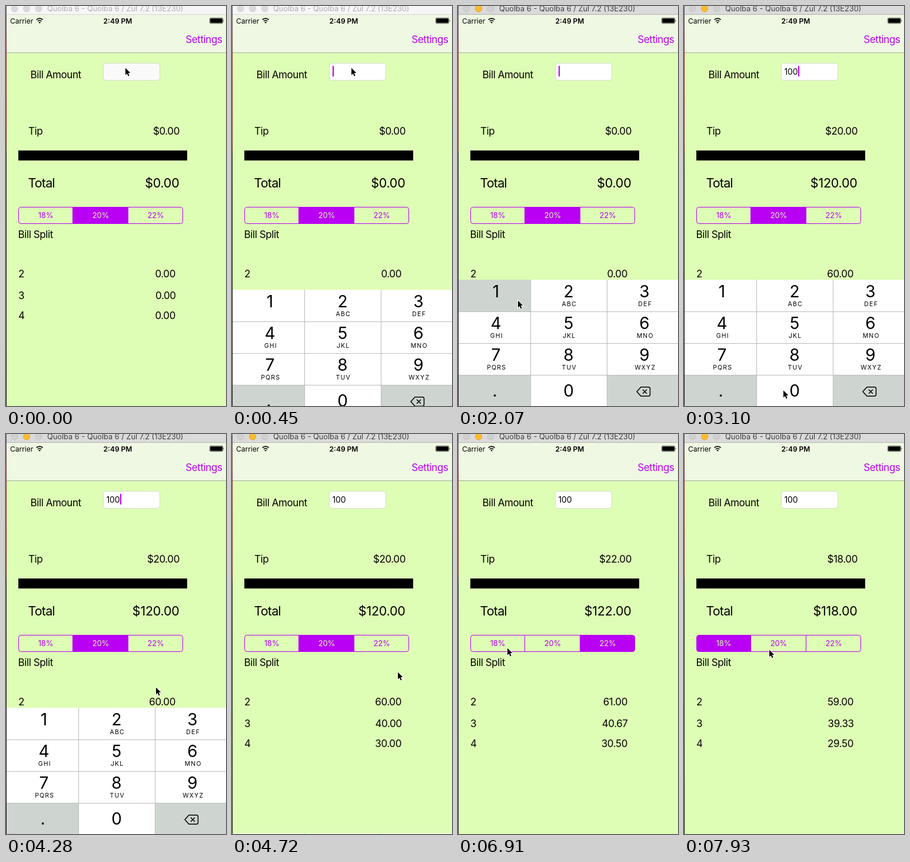
An HTML page that plays this animation: 374 by 681 pixels, repeating every 8 s.

```html
<!DOCTYPE html>
<html lang="en">
<head>
<meta charset="utf-8">
<title>Tip calculator</title>
<style>
  html, body { margin: 0; width: 100%; height: 100%; overflow: hidden; background: #defdb5; }
  svg { display: block; width: 374px; height: 681px; font: 17px Inter, Roboto, sans-serif; letter-spacing: -.024em; }
  .end { text-anchor: end; }
  .mid { text-anchor: middle; }
  .big { font-size: 21.5px; letter-spacing: -.012em; }
  .small { font-size: 12px; letter-spacing: 0; }
  .seg { font-size: 13px; letter-spacing: -.01em; }
  .digit { font-size: 28px; letter-spacing: 0; }
  .letters { font-size: 10.5px; letter-spacing: 1.2px; }
  .tint { fill: #b900f5; }
</style>
</head>
<body>
<svg id="stage" viewBox="0 0 374 681">
  <defs>
    <linearGradient id="desk" x1="0" y1="0" x2="0" y2="1">
      <stop offset="0" stop-color="#5b6170"/>
      <stop offset=".13" stop-color="#863038"/>
      <stop offset=".35" stop-color="#702a30"/>
      <stop offset=".38" stop-color="#222"/>
      <stop offset="1" stop-color="#111"/>
    </linearGradient>
  </defs>
  <rect width="374" height="681" fill="#defdb5"/>

  <!-- window title -->
  <rect id="bar" width="374" height="14"/>
  <rect id="barLine" y="14" width="374" height="1"/>
  <g id="lights" stroke-width="1">
    <circle cx="14.5" cy="4.5" r="5.5"/>
    <circle cx="35" cy="4.5" r="5.5"/>
    <circle cx="55.5" cy="4.5" r="5.5"/>
  </g>
  <text id="title" x="70" y="9" style="font-size:12.8px;letter-spacing:0">Quolba 6 - Quolba 6 / Zul 7.2 (13E230)</text>

  <!-- status and navigation -->
  <rect y="15" width="374" height="64" fill="#eff8e2"/>
  <rect y="79" width="374" height="1" fill="#a7b09c"/>
  <text class="small" x="7" y="29.5">Carrier</text>
  <path d="M51.7 23.4a7.6 7.6 0 0 1 10.8 0M54 26a4.4 4.4 0 0 1 6.2 0" fill="none" stroke="#000" stroke-width="1.7"/>
  <path d="M57.1 29.8l-1.8-2a2.6 2.6 0 0 1 3.6 0z"/>
  <text class="small mid" x="190" y="29.5" font-weight="600">2:49 PM</text>
  <rect x="346.3" y="20.3" width="22.4" height="9.4" rx="2" fill="none" stroke="#000" stroke-width=".6"/>
  <rect x="347.2" y="21.2" width="20.6" height="7.6" rx="1"/>
  <path d="M369.6 23.2q1.8 1.8 0 3.6z"/>
  <text class="end tint" x="367.5" y="63">Settings</text>

  <!-- form -->
  <text x="41.5" y="122.5">Bill Amount</text>
  <rect id="field" x="165.5" y="97.5" width="96" height="29" rx="4.5" stroke="#d6dccb"/>
  <text id="amount" x="170.5" y="117" style="font-size:14px;letter-spacing:-.01em"></text>
  <rect id="caret" class="tint" y="102" width="2" height="18"/>
  <text x="38" y="218.5">Tip</text>
  <text id="tip" class="end" x="295" y="218.5"></text>
  <rect x="21" y="246" width="287" height="17"/>
  <text class="big" x="37.5" y="308.5" style="letter-spacing:-.04em">Total</text>
  <text id="total" class="big end" x="294.5" y="308.5"></text>
  <g id="segments"></g>
  <text x="20.5" y="395">Bill Split</text>
  <g id="splits"></g>

  <g id="pad"></g>
  <path id="pointer" d="M1 1.6V13.4L3.8 10.9 5.7 15.4 7.6 14.5 5.7 10.1H9.4Z" stroke="#fff" stroke-width="2" paint-order="stroke"/>
  <rect width="1" height="681" fill="url(#desk)"/>
</svg>
<script>
const LOOP = 8000, START = 300, TICK = 146.7;
const PURPLE = '#b900f5', LIME = '#defdb5', GREY = '#ced5d0';
const $ = id => document.getElementById(id);

function add(parent, tag, attrs, text = '') {
  const el = document.createElementNS('http://www.w3.org/2000/svg', tag);
  for (const name in attrs) el.setAttribute(name, attrs[name]);
  el.textContent = text;
  return parent.appendChild(el);
}

// Segmented control
const RATES = [18, 20, 22];
const SHAPES = [
  'M113.5 342.5H25.5a4 4 0 0 0 -4 4V366.5a4 4 0 0 0 4 4H113.5Z',
  'M113.5 342.5H207.5V370.5H113.5Z',
  'M207.5 342.5H296.5a4 4 0 0 1 4 4V366.5a4 4 0 0 1 -4 4H207.5Z'
];
const segments = RATES.map((rate, i) => ({
  rate,
  box: add($('segments'), 'path', { d: SHAPES[i], stroke: PURPLE, fill: PURPLE }),
  label: add($('segments'), 'text', { class: 'seg mid', x: [67.5, 161, 254.5][i], y: 361 }, rate + '%')
}));

// Split rows: people, right edge, baseline
const splits = [[2, 288, 461.5], [3, 288.6, 498.5], [4, 288, 532.5]].map(([people, x, y]) => {
  add($('splits'), 'text', { x: 21, y }, people);
  return { people, value: add($('splits'), 'text', { class: 'end', x, y }) };
});

// Number pad
const PAD_TOP = 466, PAD_HEIGHT = 216, ROW = 54;
const EDGES = [1, 123.5, 253.5, 374], CENTERS = [64.5, 188, 317];
const LETTERS = ['', 'ABC', 'DEF', 'GHI', 'JKL', 'MNO', 'PQRS', 'TUV', 'WXYZ'];
const LABELS = [1, 2, 3, 4, 5, 6, 7, 8, 9, '.', 0, ''];
const keys = {};
LABELS.forEach((label, i) => {
  const col = i % 3, y = Math.floor(i / 3) * ROW;
  const fill = label === '.' || label === '' ? GREY : '#fff';
  keys[label] = add($('pad'), 'rect', { x: EDGES[col], y, width: EDGES[col + 1] - EDGES[col], height: ROW, fill });
  add($('pad'), 'text', { class: 'digit mid', x: CENTERS[col] - (label === '.' ? 2 : 0), y: y + (i > 8 ? 37 : 30) }, label);
  add($('pad'), 'text', { class: 'letters mid', x: CENTERS[col] + 1.2, y: y + 44.7 }, LETTERS[i] || '');
});
add($('pad'), 'path', {
  d: 'M0 54.5H374M0 108.5H374M0 162.5H374M123.5 0V216M253.5 0V216',
  stroke: '#b9bcb9', fill: 'none'
});
add($('pad'), 'path', {
  d: 'M304 190.5L311 182.8H323.5q3 0 3 3V195.2q0 3 -3 3H311ZM314 187l7 7m0 -7l-7 7',
  stroke: '#000', 'stroke-width': 1.5, 'stroke-linejoin': 'round', fill: 'none'
});

// Pointer stops: tick, x, y
const PATH = [
  [0, 202, 104], [1, 202, 104], [7, 101, 500], [12, 101, 500], [15, 168, 653],
  [20, 168, 653], [27, 254, 430], [29, 254, 430], [30, 281, 404], [38, 255, 358],
  [40, 255, 359], [45, 83, 363], [50, 83, 363], [52, 144, 366]
];

function pointerAt(k) {
  const i = PATH.findIndex(p => p[0] >= k);
  if (i < 0) return PATH[PATH.length - 1].slice(1);
  if (i === 0) return PATH[0].slice(1);
  const [k0, x0, y0] = PATH[i - 1], [k1, x1, y1] = PATH[i];
  const u = (k - k0) / (k1 - k0), e = u * u * (3 - 2 * u);
  return [x0 + (x1 - x0) * e, y0 + (y1 - y0) * e];
}

// Critically damped slide up; after closing, a sliver stays at the stage's edge
function padOffset(k) {
  if (k < 0 || k > 38) return PAD_HEIGHT;
  if (k >= 30) return PAD_HEIGHT - 2;
  const s = 18.26 * (.083 + .147 * k);
  return PAD_HEIGHT * (1 + s) * Math.exp(-s);
}

function caretOn(k) {
  const last = [19, 18, 13, 9, 0].find(n => n <= k);
  return k >= 0 && k < 30 && (k - last) % 7 < 4;
}

function paintWindow(active) {
  $('bar').setAttribute('fill', active ? '#dadada' : '#f6f6f6');
  $('barLine').setAttribute('fill', active ? '#b4b4b4' : '#d6d6d6');
  $('title').setAttribute('fill', active ? '#3e3e3e' : '#aeaeae');
  [...$('lights').children].forEach((dot, i) => {
    const lit = active && i === 1;
    dot.setAttribute('fill', lit ? '#fdbd2f' : active ? '#d0d0d0' : '#dadada');
    dot.setAttribute('stroke', lit ? '#e0a12a' : active ? '#c2c2c2' : '#d0d0d0');
  });
}

function paintSegments(rate, pressed) {
  for (const s of segments) {
    const on = s.rate === rate;
    s.box.setAttribute('fill-opacity', on ? 1 : s.rate === pressed ? .15 : 0);
    s.label.setAttribute('fill', on ? LIME : PURPLE);
  }
}

function render(time) {
  const k = Math.floor((time % LOOP - START) / TICK);
  const text = k < 13 ? '' : k < 18 ? '1' : k < 19 ? '10' : '100';
  const rate = k < 40 ? 20 : k < 47 ? 22 : 18;
  const bill = Number(text), tip = bill * rate / 100, total = bill + tip;

  paintWindow(k >= 9);
  paintSegments(rate, k === 39 ? 22 : k === 46 ? 18 : 0);
  $('field').setAttribute('fill', k < 0 ? '#fafafa' : '#fff');
  $('amount').textContent = text;
  $('tip').textContent = '$' + tip.toFixed(2);
  $('total').textContent = '$' + total.toFixed(2);
  for (const s of splits) s.value.textContent = (total / s.people).toFixed(2);

  $('caret').setAttribute('x', [171, 179, 186.5, 194][text.length]);
  $('caret').setAttribute('visibility', caretOn(k) ? 'visible' : 'hidden');
  $('pad').setAttribute('transform', `translate(0 ${Math.round(PAD_TOP + padOffset(k))})`);
  keys[1].setAttribute('fill', k === 11 || k === 12 ? GREY : '#fff');
  keys[0].setAttribute('fill', k === 17 || k === 18 ? GREY : '#fff');
  $('pointer').setAttribute('transform', `translate(${pointerAt(k).map(Math.round).join(' ')})`);
}

const begin = performance.now();
function frame() {
  render(performance.now() - begin);
  requestAnimationFrame(frame);
}
frame();
</script>
</body>
</html>
```
